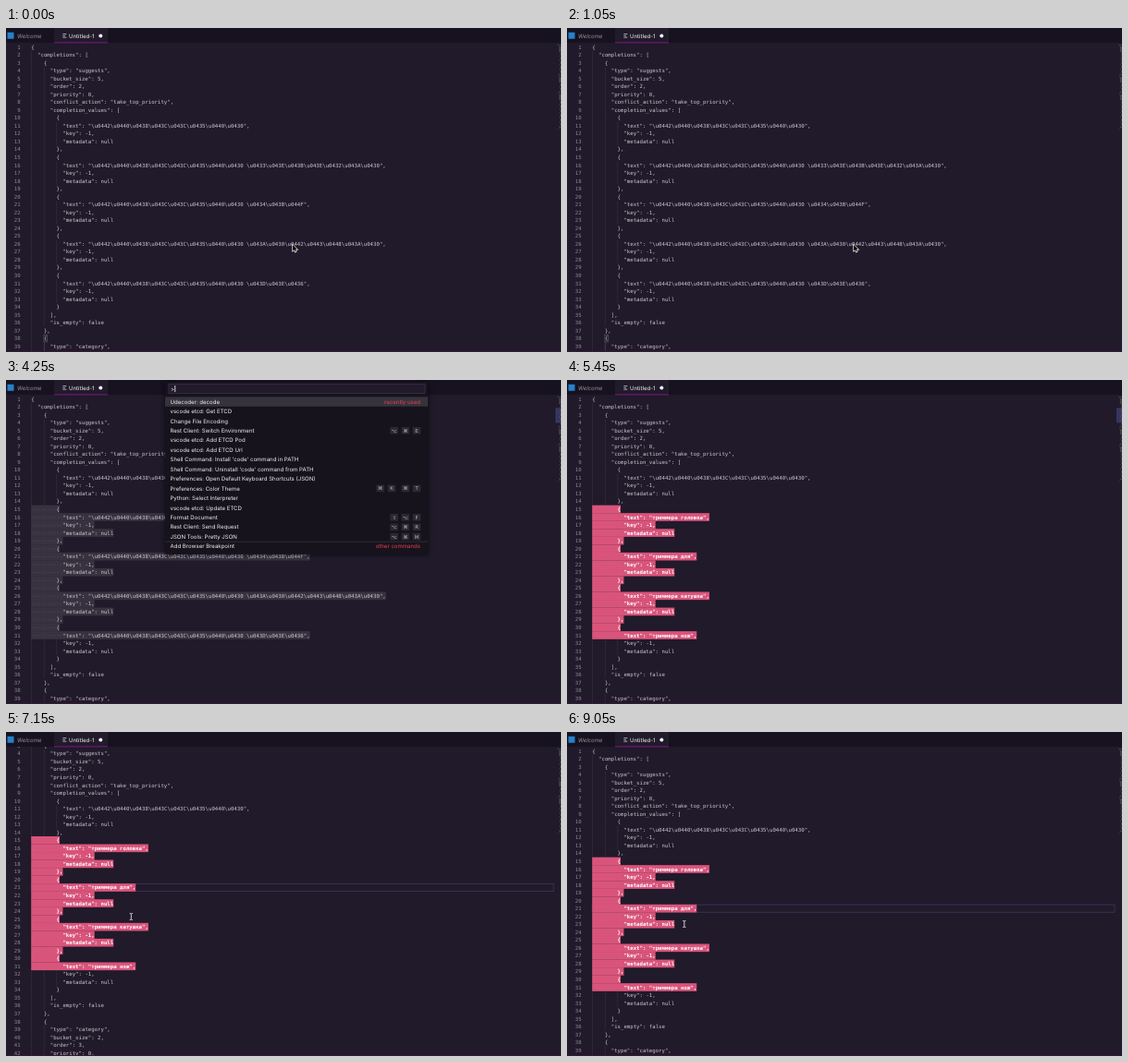
Recreate the animation shown at these times as an HTML page with a canvas. Size 600 by 351 pixels, loop 9100 ms.

```html
<!DOCTYPE html>
<html lang="en">
<head>
<meta charset="utf-8">
<title>Decoding escapes in an editor</title>
<style>
html, body { margin: 0; width: 100%; height: 100%; overflow: hidden; background: #201a2a; }
canvas { display: block; }
</style>
</head>
<body>
<canvas id="stage" width="600" height="351"></canvas>
<script>
const ctx = document.getElementById('stage').getContext('2d');
ctx.textRendering = 'geometricPrecision';

const LOOP = 9100, ROW = 8.533, COL = 3.4246, LEFT = 27.2, TOP = 16.2;
const MONO = '5.689px "DejaVu Sans Mono", monospace';
const UI = '6.07px Inter, sans-serif';
const KEYS = '5.2px "DejaVu Sans", sans-serif';
const PALETTE_OPEN = 4250, DECODED = 5000, CLICK = 6600;

// Document text
const group = (type, bucket_size, order, texts, firstKey) => ({
  type, bucket_size, order, priority: 0,
  conflict_action: 'take_top_priority',
  completion_values: texts.map((text, i) => ({
    text, key: firstKey < 0 ? -1 : firstKey + i, metadata: null
  })),
  is_empty: false
});
const plain = JSON.stringify({
  completions: [
    group('suggests', 5, 2, ['триммера', 'триммера головка', 'триммера для',
      'триммера катушка', 'триммера нож'], -1),
    group('category', 2, 3, ['Триммеры', 'Триммеры для бороды и усов'], 10766),
    group('brand', 2, 4, Array(6).fill('Norvela'), 311)
  ]
}, null, 2).split('\n');
const escaped = plain.map(line => line.replace(/[а-я]/gi,
  c => '\\u0' + c.charCodeAt(0).toString(16).toUpperCase()));
const indentOf = line => line.search(/\S/);
const isDecoded = (i, t) => t >= DECODED && i >= 14 && i <= 30;

// Command palette entries: label, shortcut, note
const commands = [
  ['Udecoder: decode', '', 'recently used'],
  ['vscode etcd: Get ETCD'],
  ['Change File Encoding'],
  ['Rest Client: Switch Environment', '⌥⌘E'],
  ['vscode etcd: Add ETCD Pod'],
  ['vscode etcd: Add ETCD Url'],
  ["Shell Command: Install 'code' command in PATH"],
  ["Shell Command: Uninstall 'code' command from PATH"],
  ['Preferences: Open Default Keyboard Shortcuts (JSON)'],
  ['Preferences: Color Theme', '⌘K ⌘T'],
  ['Python: Select Interpreter'],
  ['vscode etcd: Update ETCD'],
  ['Format Document', '⇧⌥F'],
  ['Rest Client: Send Request', '⌥⌘R'],
  ['JSON Tools: Pretty JSON', '⌥⌘M'],
  ['Add Browser Breakpoint', '', 'other commands']
];

// Motion keys: [time, value...]
const scrollKeys = [[150, 0], [550, 225.7], [850, 225.7], [1050, 0],
  [6900, 0], [7200, 24.5], [7450, 24.5], [7800, 0],
  [8300, 0], [8600, 24.5], [8750, 24.5], [9050, 0]];
const mouseKeys = [[1350, 310, 235], [2050, 337, 277], [2350, 337, 277], [3100, 18, 138],
  [5900, 18, 138], [6850, 135.3, 200], [7800, 135.3, 200], [8050, 126.8, 208]];

function along(keys, t) {
  const next = keys.findIndex(k => k[0] > t);
  if (next === 0) return keys[0].slice(1);
  if (next < 0) return keys[keys.length - 1].slice(1);
  const a = keys[next - 1], b = keys[next];
  const u = (t - a[0]) / (b[0] - a[0]), e = u * u * (3 - 2 * u);
  return a.slice(1).map((v, i) => v + (b[i + 1] - v) * e);
}

function rect(x, y, w, h, color) {
  ctx.fillStyle = color;
  ctx.fillRect(x, y, w, h);
}
function frame(x, y, w, h, color, width = 0.8) {
  ctx.strokeStyle = color;
  ctx.lineWidth = width;
  ctx.strokeRect(x, y, w, h);
}
function text(s, x, y, color, font, align = 'left') {
  ctx.font = font;
  ctx.textAlign = align;
  ctx.fillStyle = color;
  ctx.fillText(s, x, y);
}
function code(line, y, color, font) {
  for (const m of line.matchAll(/\\u\w{4}|[^\s\\]+/g))
    text(m[0], LEFT + m.index * COL, y, color, font);
}

function selection(t) {
  if (t < 2400 || t >= CLICK) return null;
  const [x, y] = along(mouseKeys, Math.min(t, 3100));
  return { line: Math.floor((y - TOP) / ROW), col: Math.max(0, Math.round((x - LEFT) / COL)) };
}

function drawLine(i, y, t, sel) {
  const pink = isDecoded(i, t);
  const line = pink ? plain[i] : escaped[i];
  const indent = indentOf(line), base = y + ROW / 2 + 2.05;

  for (let c = 0; c < indent; c += 4) {
    const active = t < 2400 && c === 4 && i > 37 && i < 56;
    rect(LEFT + c * COL, y, 0.6, ROW, active ? '#5b5463' : '#39323f');
  }
  if (pink) {
    rect(LEFT, y, line.length * COL, ROW + 0.1, '#d9547b');
  } else if (sel && i >= sel.line && i <= 30) {
    const from = i === sel.line ? Math.min(sel.col, line.length) : 0;
    const to = line.length - (i === 30 ? 1 : 0);
    rect(LEFT + from * COL, y, Math.max(0, to - from + (i === 30 ? 1 : 0)) * COL, ROW + 0.1, '#383240');
    for (let c = from; c < indent; c++)
      rect(LEFT + (c + 0.4) * COL, y + ROW / 2, 0.8, 0.8, '#5c5664');
  }
  if (t < 2400 && (i === 37 || i === 56))
    frame(LEFT + 4 * COL, y + 0.4, COL, ROW - 0.8, '#66606a', 0.6);

  text(i + 1, 15.6, base, '#8d8894', MONO, 'right');
  code(line, base, pink ? '#fff' : '#cbc7cf', pink ? 'bold ' + MONO : MONO);
}

function drawEditor(t, scroll, sel) {
  ctx.save();
  ctx.beginPath();
  ctx.rect(0, 16, 600, 335);
  ctx.clip();

  const current = t < 2350 ? 41 : t < 2400 ? 30 : t >= CLICK ? 20 : -1;
  if (current >= 0)
    frame(LEFT, TOP + current * ROW - scroll + 0.2, 592 - LEFT, ROW - 0.4, '#40365f');

  plain.forEach((_, i) => {
    const y = TOP + i * ROW - scroll;
    if (y > 6 && y < 351) drawLine(i, y, t, sel);
  });

  if (t >= 2350 && t < 2400) rect(328, TOP + 30 * ROW, 1, ROW, '#e8404f');
  const caretOn = t >= 3100 && t < 3500 || t >= 4050 && t < PALETTE_OPEN;
  if (caretOn) rect(LEFT, TOP + 14 * ROW, 1, ROW, '#e8404f');

  if (sel) rect(594, 17 + sel.line * 0.95, 6, (31 - sel.line) * 0.95, '#37355f');
  plain.forEach((line, i) => {
    const indent = indentOf(line);
    rect(596 + indent * 0.3, 17.4 + i * 0.95, (line.length - indent) * 0.4, 0.5, '#6b6572');
  });
  rect(0, 350, 600, 1, '#32173b');
  ctx.restore();
}

function drawTabs() {
  rect(0, 0, 600, 16, '#17121f');
  rect(52, 0, 58, 16, '#211b2b');
  rect(52, 15.3, 58, 1, '#7d1580');
  rect(1.5, 4.7, 7, 7, '#2582cc');
  text('Welcome', 12, 10.8, '#96919c', 'italic ' + UI);
  [6.2, 8, 9.8].forEach((y, i) => rect(61.3, y, i === 1 ? 2.8 : 4, 0.8, '#c9c5cd'));
  text('Untitled-1', 68, 10.8, '#f4f2f5', UI);
  ctx.beginPath();
  ctx.arc(102.3, 8.5, 2, 0, 7);
  ctx.fill();
}

function drawPalette(t) {
  const query = 'ude'.slice(0, t < 4500 ? 0 : 1 + Math.floor((t - 4500) / 150));
  const rows = commands.filter(c => c[0].toLowerCase().includes(query));
  const height = 18 + rows.length * 10.45 + 1.5;

  ctx.save();
  ctx.shadowColor = '#000a';
  ctx.shadowBlur = 5;
  rect(172, 2, 284, height, '#17131d');
  ctx.restore();
  rect(176, 4.3, 277, 10, '#211b2a');
  frame(176, 4.3, 277, 10, '#4b2c5c', 0.7);
  text('>' + query, 178, 11.6, '#eee', UI);
  rect(178.4 + ctx.measureText('>' + query).width, 6, 0.8, 7, '#fff');

  rows.forEach(([label, keys = '', note], i) => {
    const y = 23.4 + i * 10.45;
    if (i === 0) rect(172, y - 5.1, 284, 10.4, '#37333d');
    else if (note) rect(172, y - 5.3, 284, 0.5, '#46414d');
    text(label, 177.5, y + 2.2, '#f0eef2', UI);
    if (note) text(note, 448, y + 2.2, '#e2424f', UI, 'right');
    let x = 444;
    for (const key of [...keys].reverse()) {
      if (key === ' ') { x -= 2.7; continue; }
      rect(x - 4.3, y - 3.8, 8.6, 7.6, '#2d2934');
      text(key, x, y + 1.9, '#c6c2ca', KEYS, 'center');
      x -= 12.2;
    }
  });
}

function drawMouse(t) {
  if (t >= 3500 && t < 5950) return;
  const [x, y] = along(mouseKeys, t);
  ctx.save();
  ctx.translate(x, y);
  if (t >= 2350 && t < 3100) {
    ctx.beginPath();
    ctx.arc(0, 0.6, 9.3, 0, 7);
    ctx.fillStyle = '#8886892a';
    ctx.fill();
    ctx.strokeStyle = '#77717c';
    ctx.lineWidth = 1.4;
    ctx.stroke();
  }
  if (t < 5950) {
    const arrow = new Path2D('M0 0V6.5L1.6 5.2 2.6 7.6 3.7 7.1 2.7 4.8H4.8Z');
    ctx.strokeStyle = '#fff';
    ctx.lineWidth = 1.3;
    ctx.stroke(arrow);
    ctx.fillStyle = '#000';
    ctx.fill(arrow);
  } else {
    ctx.strokeStyle = '#e6e4e8';
    ctx.lineWidth = 0.9;
    ctx.stroke(new Path2D('M-1.6 -3.6Q0 -3.6 0 -2.6Q0 -3.6 1.6 -3.6M0 -2.6V2.6M-1.6 3.6Q0 3.6 0 2.6Q0 3.6 1.6 3.6'));
  }
  ctx.restore();
}

function draw(now) {
  const t = Math.floor(now % LOOP / 50) * 50;
  rect(0, 0, 600, 351, '#201a2a');
  drawEditor(t, along(scrollKeys, t)[0], selection(t));
  drawTabs();
  if (t >= PALETTE_OPEN && t < DECODED) drawPalette(t);
  drawMouse(t);
}

const start = performance.now();
function tick() {
  draw(performance.now() - start);
  requestAnimationFrame(tick);
}
tick();
</script>
</body>
</html>
```
